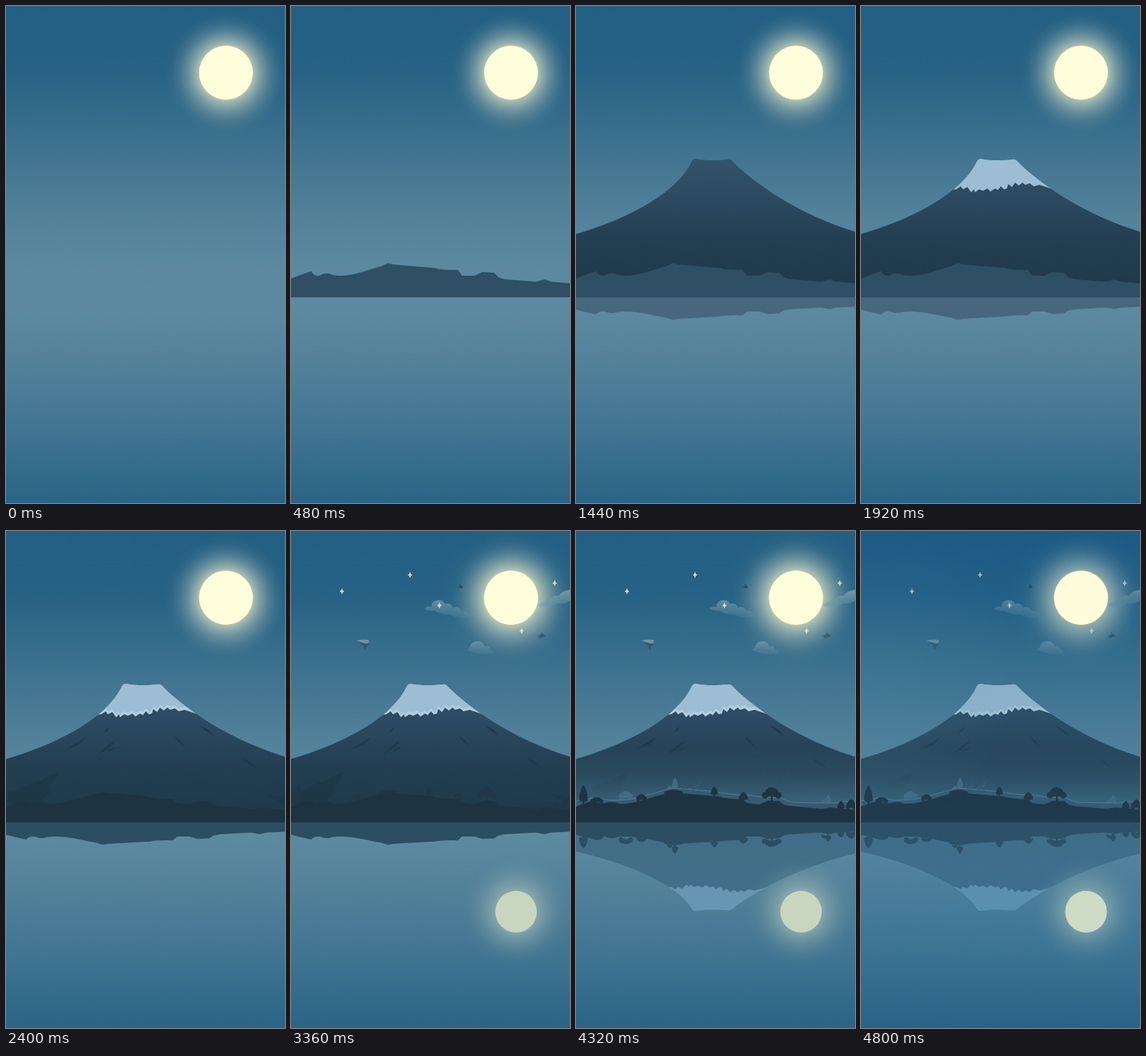
Recreate the animation shown at these times as an HTML page with a canvas. Size 375 by 667 pixels, loop 5280 ms.

```html
<!DOCTYPE html>
<html lang="en">
<head>
<meta charset="utf-8">
<title>Moonlit mountain</title>
<style>
html, body { margin: 0; width: 100%; height: 100%; overflow: hidden; background: #2a6486; }
canvas { display: block; width: 100%; height: 100%; }
</style>
</head>
<body>
<canvas id="stage"></canvas>
<script>
const W = 375, H = 667, STEP = 480, STEPS = 11, SHORE = 391;
const canvas = document.getElementById('stage');
const ctx = canvas.getContext('2d');
const ratio = window.devicePixelRatio || 1;
canvas.width = W * ratio;
canvas.height = H * ratio;

const mountain = new Path2D('M0 306C62 288 126 257 151 217C156 209 156 205 161 205C175 208 192 207 204 206C209 205 211 210 218 216C252 246 302 280 375 303V391H0Z');
const snow = new Path2D('M118 247L128 246L134 242L137 246L143 243L148 250L152 246L153 250L159 246L164 248L170 245L174 249L180 245L184 247L188 242L192 246L196 245L198 239L203 243L207 237L212 241L217 237L221 240L227 238L232 242L240 240L258 246L265 245L218 200H150Z');
const hills = new Path2D('M0 366Q14 360 27 356Q31 363 38 362Q48 356 56 361C75 365 95 357 115 351L122 349L130 345L138 347L193 351.500Q202 355 224 354L230 362L247 362L257 357L273 358L279 364Q285 367 297 367.500L329 370L341 367L350 370L375 372V391H0Z');
const front = new Path2D('M0 370Q14 364 25 362Q32 367 40 365Q50 362 58 366C76 367 95 359 115 354L130 350.500L142 352L190 356Q204 360 224 360L230 365L246 367L258 362L273 362.500L280 368Q290 370 300 370L330 373L342 371L375 374.500V391H0Z');
const ridge = new Path2D('M0 362Q16 359 30 358Q42 363 60 361C80 361 95 354 112 350L130 345L145 346L190 350Q204 354 228 354L250 357L275 358Q282 363 292 364L320 365L345 365L360 363L375 364V391H0Z');

function vertical(y0, y1, ...colors) {
  const g = ctx.createLinearGradient(0, y0, 0, y1);
  colors.forEach((c, i) => Array.isArray(c) ? g.addColorStop(c[0], c[1]) : g.addColorStop(i / (colors.length - 1), c));
  return g;
}

function fill(shape, style) {
  ctx.fillStyle = style;
  ctx.fill(shape);
}

function rect(style, x = 0, y = 0, w = W, h = H) {
  ctx.fillStyle = style;
  ctx.fillRect(x, y, w, h);
}

function disc(x, y, r, style) {
  ctx.fillStyle = style;
  ctx.beginPath();
  ctx.arc(x, y, r, 0, Math.PI * 2);
  ctx.fill();
}

function glow(x, y, inner, outer, rgb, strength) {
  const g = ctx.createRadialGradient(x, y, inner, x, y, outer);
  for (let k = 0; k <= 8; k++) {
    g.addColorStop(k / 8, `rgba(${rgb},${strength * Math.pow(1 - k / 8, 2)})`);
  }
  disc(x, y, outer, g);
}

function scoped(draw) {
  ctx.save();
  draw();
  ctx.restore();
}

// Flip about a horizontal line so that y becomes base - y * scale.
function mirrored(base, scale, draw) {
  scoped(() => {
    ctx.transform(1, 0, 0, -scale, 0, base);
    draw();
  });
}

function sky() {
  rect(vertical(0, H, [0, '#235f83'], [0.13, '#266285'], [0.3, '#41748f'], [0.42, '#52819a'],
    [0.53, '#5c89a0'], [0.61, '#5d8aa0'], [0.72, '#52819a'], [0.86, '#407491'], [1, '#2a6486']));
}

function moon() {
  glow(295.7, 89.5, 34, 84, '235,235,200', 0.75);
  disc(295.7, 89.5, 36.2, '#fffedb');
}

function moonImage() {
  glow(302.5, 511, 26, 76, '200,214,192', 0.5);
  disc(302.5, 511, 27.9, '#c8d6c0');
}

function star(x, y) {
  ctx.beginPath();
  ctx.moveTo(x, y - 3.4);
  ctx.quadraticCurveTo(x, y, x + 2.6, y);
  ctx.quadraticCurveTo(x, y, x, y + 3.4);
  ctx.quadraticCurveTo(x, y, x - 2.6, y);
  ctx.quadraticCurveTo(x, y, x, y - 3.4);
  ctx.lineWidth = 0.8;
  ctx.strokeStyle = ctx.fillStyle = '#dfe9cf';
  ctx.fill();
  ctx.stroke();
}

function clouds() {
  fill(new Path2D('M179 104Q184 100 189 102Q188 95 196 93Q204 92 207 98Q214 95 218 103Q225 100 229 107Q238 106 242 115Q226 119 213 112Q198 112 193 107Q185 108 179 104Z'),
    vertical(92, 118, '#6592a7', 'rgba(83,130,154,.25)'));
  fill(new Path2D('M236 159Q240 158 241 154Q243 148 251 148Q258 148 260 155Q266 152 268 159Q272 160 272 164Q252 168 236 159Z'),
    vertical(147, 167, '#6592a7', 'rgba(83,130,154,.25)'));
  fill(new Path2D('M332 101Q333 95 342 95Q343 89 350 90Q354 85 360 87Q363 80 375 79V94Q367 99 359 97Q349 104 332 101Z'),
    vertical(79, 104, '#7099a6', 'rgba(90,140,158,.3)'));
}

function birds() {
  fill(new Path2D('M223 75L227 74L226 70L229 73L231 75L229 77Z'), '#2d4d64');
  fill(new Path2D('M88 147Q95 145 104 146L105 149L101 152L96 150Z'), '#6d94a7');
  fill(new Path2D('M91 149L105 152L101 155L99 160L97 154Z'), '#35546b');
  fill(new Path2D('M330 141L337 139L336 136L340 139L343 141L337 143L331 145L335 142Z'), '#38586d');
}

function paintMountain(detail) {
  fill(mountain, vertical(205, 372, '#33546b', '#2b4960', '#233e51', '#203a4c'));
  if (!detail) return;
  const mark = new Path2D('M140 262L130 271L136 268ZM107 277L95 284L81 293L98 287ZM148 281L136 288L124 299L135 294ZM149 289L139 293L134 298L143 294ZM260 260L267 267L281 276L272 267ZM226 275L230 281L240 290L234 281ZM316 305L326 313L338 319L328 309Z');
  fill(mark, '#20394c');
  fill(new Path2D('M71 323L56 329L49 334L31 340L17 347L0 351V366H43L61 349L58 342L65 337Z'), 'rgba(28,52,67,.5)');
  fill(new Path2D('M347 353L375 358V368L365 362Z'), 'rgba(28,52,67,.4)');
}

function paintSnow(edge) {
  scoped(() => {
    ctx.clip(mountain);
    fill(snow, edge ? '#b1cede' : '#9dbdd4');
    if (!edge) return;
    ctx.translate(0, -4);
    fill(snow, '#9dbdd4');
  });
}

function conifer(x, top, base, w) {
  const h = base - top;
  ctx.beginPath();
  ctx.moveTo(x, top);
  ctx.bezierCurveTo(x + w * 0.35, top + h * 0.15, x + w * 0.6, top + h * 0.7, x + w / 2, base - h * 0.15);
  ctx.lineTo(x + 1, base - 1);
  ctx.lineTo(x + 1, base + 3);
  ctx.lineTo(x - 1, base + 3);
  ctx.lineTo(x - 1, base - 1);
  ctx.lineTo(x - w / 2, base - h * 0.15);
  ctx.bezierCurveTo(x - w * 0.6, top + h * 0.7, x - w * 0.35, top + h * 0.15, x, top);
  ctx.fill();
}

function bush(x, y, w, h) {
  ctx.beginPath();
  for (let k = 0; k < 5; k++) {
    const u = k / 2 - 1;
    ctx.ellipse(x + u * w * 0.36, y - h * (0.3 + 0.3 * (1 - u * u)), w * 0.17, h * 0.4, 0, 0, 7);
  }
  ctx.fill();
}

function trees(color) {
  ctx.fillStyle = color;
  conifer(10, 341, 365, 11);
  conifer(186, 343, 355, 9);
  conifer(225, 350, 362, 12);
  conifer(356, 362, 374, 9);
  bush(28, 365, 16, 8);
  bush(88, 362, 13, 9);
  bush(131, 353, 24, 6);
  bush(263, 358, 25, 11);
  bush(263, 352, 16, 8);
  ctx.fillRect(262, 354, 2.5, 11);
  bush(370, 374, 13, 14);
}

function farTrees(color) {
  ctx.fillStyle = color;
  conifer(133, 331, 346, 8);
  conifer(339, 354, 367, 8);
  bush(67, 361, 18, 12);
  bush(126, 348, 7, 6);
  bush(335, 367, 10, 7);
}

function deer(x, y, s) {
  scoped(() => {
    ctx.translate(x, y);
    ctx.scale(s, s);
    fill(new Path2D('M-5 -8L2 -9L4 -13L7 -13L5 -10L4 -6L4 0H3L2 -5L-3 -5L-4 0H-5Z'), '#35596f');
    ctx.strokeStyle = '#35596f';
    ctx.lineWidth = 0.8;
    ctx.stroke(new Path2D('M5 -13L3 -16L4 -18M5 -13L8 -16L7 -18M3 -16L1 -17'));
  });
}

function mist() {
  scoped(() => {
    ctx.clip(mountain);
    rect(vertical(290, 372, 'rgba(75,125,150,0)', 'rgba(75,125,150,.25)', 'rgba(78,128,152,.65)'), 0, 290, W, 101);
  });
  farTrees('#426a81');
  fill(ridge, '#365a70');
  ctx.strokeStyle = '#527d94';
  ctx.lineWidth = 1;
  ctx.stroke(ridge);
}

function mountainImage() {
  mirrored(672, 0.79, () => {
    scoped(() => {
      ctx.beginPath();
      ctx.rect(0, 150, W, 205.7);
      ctx.clip();
      fill(mountain, vertical(205, 356, 'rgba(59,105,134,.72)', 'rgba(58,99,125,.75)'));
      ctx.clip(mountain);
      fill(snow, '#6796b2');
    });
  });
}

// Cooler night tint for the finished scene.
function grade() {
  rect(vertical(0, H, 'rgba(12,78,135,.3)', 'rgba(25,95,140,.16)', 'rgba(40,110,150,.1)', 'rgba(35,110,160,.16)', 'rgba(30,95,145,.2)'));
  const g = ctx.createRadialGradient(0, 190, 0, 0, 190, 210);
  g.addColorStop(0, 'rgba(95,150,175,.14)');
  g.addColorStop(1, 'rgba(95,150,175,0)');
  rect(g, 0, 0, W, SHORE);
  disc(295.7, 89.5, 36.2, '#fefddb');
  disc(302.5, 511, 27.9, '#cedbc5');
}

function paint(step) {
  const detail = step >= 5;
  ctx.setTransform(ratio, 0, 0, ratio, 0, 0);
  sky();
  moon();
  if (step >= 6) {
    clouds();
    [[160, 59], [68.5, 81], [199.5, 100], [354.5, 70], [310, 134]].forEach(p => star(...p));
  }
  if (step >= 7) {
    glow(295.7, 89.5, 36, 104, '210,220,190', 0.16);
    disc(295.7, 89.5, 36.2, '#fffedb');
    birds();
  }
  if (step >= 3) paintMountain(detail);
  if (step >= 4) paintSnow(detail);
  if (step >= 8) mist();
  if (step >= 9) {
    deer(147, 348, 0.7);
    deer(162, 349, 0.92);
  }
  if (step >= 7) trees(step >= 8 ? '#1e3443' : '#1f3747');
  if (step >= 1) fill(detail ? front : hills, detail ? '#1e3342' : '#2f4f64');
  if (step >= 9) mountainImage();
  if (step >= 2) {
    const tone = detail ? '#2c4e63' : '#46677e';
    mirrored(SHORE * 1.655, 0.655, () => fill(hills, tone));
    if (step >= 9) mirrored(SHORE * 1.7, 0.7, () => {
      trees(tone);
      farTrees(tone);
    });
  }
  if (step >= 7) moonImage();
  if (step >= 10) grade();
}

const start = performance.now();
let shown = -1;
function tick(now) {
  const step = Math.floor(Math.max(0, now - start) / STEP) % STEPS;
  if (step !== shown) paint(shown = step);
  requestAnimationFrame(tick);
}
tick(start);
</script>
</body>
</html>
```
